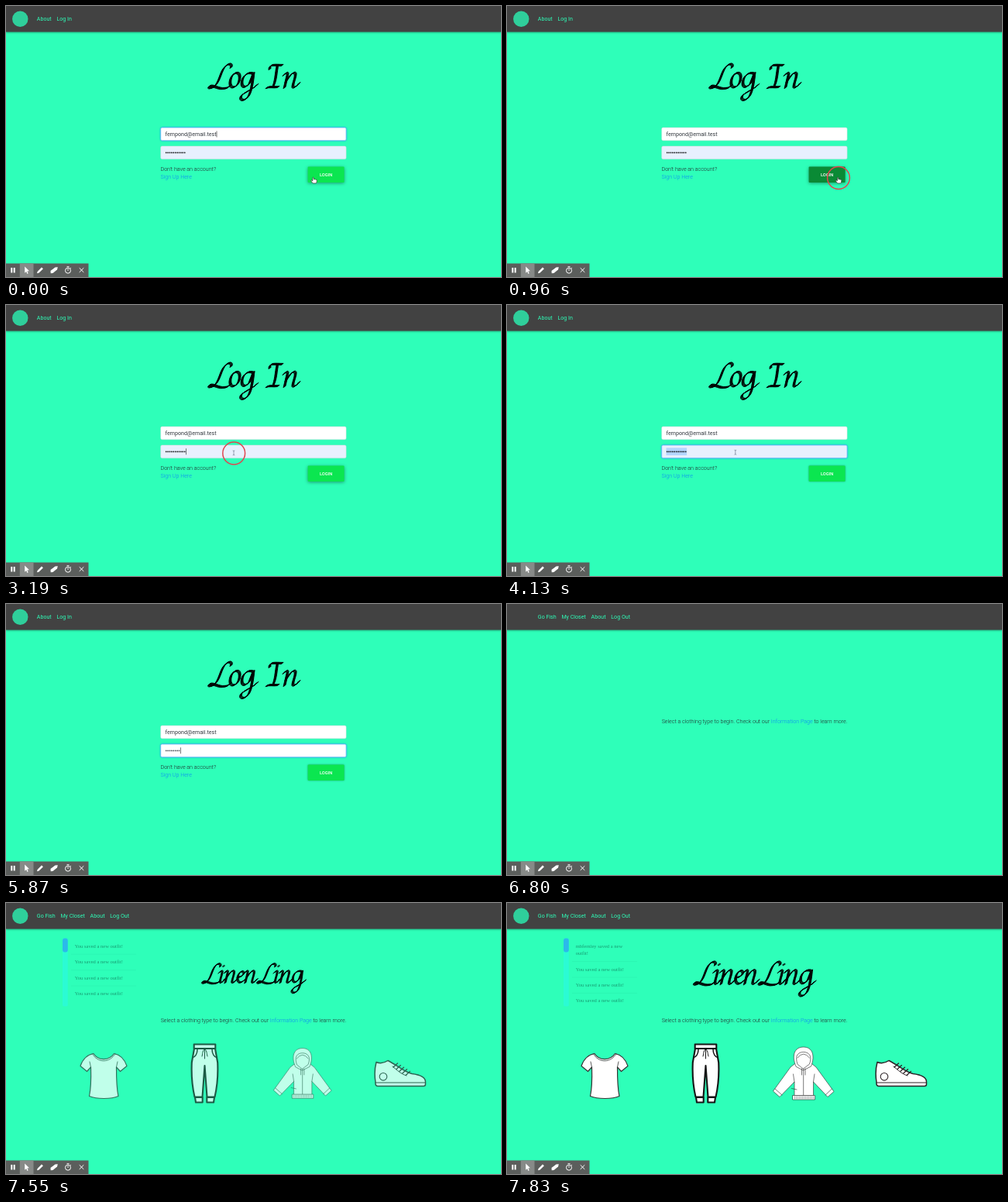
These frames come from a looping animation (639 px wide and 350 px high, 7990 ms). An HTML page:

```html
<!DOCTYPE html>
<html lang="en">
<head>
<meta charset="utf-8">
<title>Log In</title>
<style>
html, body { margin: 0; width: 100%; height: 100%; overflow: hidden; background: #2effb9; }
svg { display: block; width: 100vw; height: 100vh; }
text { font: 300 7.1px Roboto, sans-serif; fill: #212529; white-space: pre; }
.nav text { font-weight: 400; fill: #2effb9; }
.link { fill: #0a86f5; }
.field { font-weight: 400; fill: #343a40; }
.btn { font-size: 5.68px; font-weight: 500; fill: #fff; text-anchor: middle; }
.feed text { font: 6.55px "Liberation Serif", serif; fill: #189a72; }
.pen { fill: none; stroke: #000; stroke-width: .9; stroke-linecap: round; stroke-linejoin: round; }
.wear { fill: #fff; stroke: #151515; stroke-linejoin: round; stroke-linecap: round; }
.line { fill: none; }
.bar { filter: drop-shadow(0 1px 1.2px rgba(0,0,0,.3)); }
</style>
</head>
<body>
<svg viewBox="0 0 639 350" preserveAspectRatio="none">
  <rect width="639" height="350" fill="#2effb9"/>
  <rect class="bar" width="639" height="33.5" fill="#424242"/>
  <circle id="logo" cx="18.3" cy="16.8" r="10.2" fill="#2fcf9b"/>

  <g id="login">
    <g class="nav"><text x="39.8" y="19.2">About</text><text x="65.4" y="19.2">Log In</text></g>
    <g id="heading" transform="translate(260.5 105.5)" aria-label="Log In"></g>
    <rect id="mailBox" x="199.7" y="157" width="239.4" height="16.8" rx="1.8" fill="#fff"/>
    <rect id="passBox" x="199.7" y="181" width="239.4" height="16.8" rx="1.8"/>
    <text class="field" x="205.5" y="168">fernpond@email.test</text>
    <rect id="mark" x="205.5" y="184.5" width="26.6" height="9.6" fill="#b4d5fe"/>
    <g id="dots"></g>
    <rect id="caret" width=".6" height="8" fill="#222"/>
    <text x="199.5" y="212.6">Don't have an account?</text>
    <text class="link" x="199.5" y="223.2">Sign Up Here</text>
    <rect id="button" x="389.6" y="207.6" width="47" height="20.4" rx="1"/>
    <text class="btn" x="413.1" y="219.9">LOGIN</text>
    <circle id="ring" r="14.4" fill="none" stroke="#e0454f" stroke-width="1.5"/>
    <path id="hand" d="M-1.6-3.6q.8-.7 1.4 0v2.2q1-.5 1.4.1 1-.4 1.4.3 1.2-.2 1.3.6l-.5 3-.7 1h-4l-2.4-3q-.2-1.2 1-.8l1.1.8z" fill="#fff" stroke="#222" stroke-width=".6"/>
    <path id="beam" d="M-1.3-3q1.3 0 1.3 1v4q0 1-1.3 1M1.3-3Q0-3 0-2M0 2q0 1 1.3 1" fill="none" stroke="#5f6a80" stroke-width=".6"/>
  </g>

  <g id="home">
    <g class="nav">
      <text x="39.8" y="19.2">Go Fish</text><text x="70.4" y="19.2">My Closet</text>
      <text x="108.6" y="19.2">About</text><text x="134.3" y="19.2">Log Out</text>
    </g>
    <text x="319.5" y="154" text-anchor="middle">Select a clothing type to begin. Check out our <tspan class="link">Information Page</tspan> to learn more.</text>
    <g id="feed" class="feed">
      <rect x="73" y="45.5" width="6.8" height="88" rx="2" fill="#2bfbd4"/>
      <rect x="73" y="45.5" width="6.8" height="18" rx="3" fill="#2bb9ea"/>
      <g id="posts"></g>
    </g>
    <g id="brand" aria-label="LinenLing"></g>
    <g id="clothes" class="wear">
      <g stroke="#333" stroke-width="1.2">
        <path d="M113 194.5C119 204 133 204 139.5 194.5C148 196 153 202 156 210.5L147.5 217.5 142.5 212C142.5 228 143 240 145 249.5C136 253.5 117 253.5 107.5 249.5C109.5 240 110 228 109.5 212L104.5 217.5 96 210.5C99 202 104 196 113 194.5Z"/>
        <path class="line" d="M111.5 194.7C118 207 134 207 141 194.7M109.5 212L108 205M142.5 212L144 205" stroke-width=".8"/>
      </g>
      <g stroke-width="2.1">
        <path d="M243 188L239.8 206C239 224 241 240 243.5 250.5H253.5L256.5 210 259.5 250.5H269.5C272 240 274 224 273.2 206L270 188Z"/>
        <path d="M242.7 182.5H270.3V188H242.7ZM244 251H253.7V257.5H245ZM259.3 251H269L268 257.5H259.3Z"/>
        <path class="line" d="M247 189C247 195 244 199 241 199.5M266 189C266 195 269 199 272 199.5" stroke-width="1.5"/>
        <path class="line" d="M256.5 188C253 192 254 195 253 198M256.5 188C260 192 259 195 260 198M256.5 189V201" stroke-width="1"/>
      </g>
      <g id="hoodie" stroke="#333" stroke-width=".65">
        <path d="M371 208L366 212 343.5 243 352 250.5 371 231V249H395.5V231L414 250.5 422 243.5 399 212 394 208Z"/>
        <path d="M373 211C367 197 371 186 382.7 186S398 197 392.5 211L382.7 216Z"/>
        <path d="M375 208C371 197 376 192.5 382.7 192.5S394.5 197 390.500 208L382.7 214Z"/>
        <path class="line" d="M375 200Q382.7 190 390.500 200M382.7 214V249M380.5 214V222M385 214V222M371 231L369.5 221M395.5 231L397 221M374 241L367.5 239.5M346 240L355 248M419.5 240L411 248"/>
        <rect x="369" y="248.5" width="28.5" height="5.5"/>
        <path d="M371 251.2H396" stroke-width="4" stroke-dasharray=".4 1.6" stroke-linecap="butt"/>
      </g>
      <g stroke="#2b2226" stroke-width="1.5">
        <path d="M478 205.5C484 208 490 205.5 493 203.5C504 209 514 218 524 220.500C536 222 541.5 226 541.5 231V234Q541.5 236.5 539 236.5H480Q476.5 236.5 477 231.5C475.5 222 476 213 478 205.5Z"/>
        <circle cx="487" cy="224.3" r="4.8" class="line" stroke-width="1.1"/>
        <path class="line" d="M477 232H541M499 211C505 216 510 221 517 223" stroke-width="1"/>
        <path id="laces" class="line" stroke-width="1.3"/>
      </g>
    </g>
  </g>

  <g>
    <rect y="332.5" width="106.5" height="17.5" fill="#5b5e5c"/>
    <rect x="17.8" y="332.5" width="17.7" height="17.5" fill="#878a88"/>
    <g fill="#fff">
      <path d="M6.3 338h2v6.500h-2zM9.7 338h2v6.500h-2z"/>
      <path d="M24.2 336.6L30 342.2 27.4 342.5 28.7 345.3 27.4 345.9 26.2 343 24.2 344.7Z"/>
      <path d="M40 345.3L40.6 343 46 337.6 47.9 339.4 42.4 344.8Z"/>
      <path d="M57.5 342L63.5 337.5 66.8 337.3 66 340.5 60.5 345 57.7 345.3Z"/>
    </g>
    <g fill="none" stroke="#fff">
      <circle cx="80" cy="341.7" r="3.5"/>
      <path d="M78.5 336.7h3M80 339.5v2.3M83 338l.8.8M94.7 338.3l5.6 5.6M100.3 338.3l-5.6 5.6"/>
    </g>
  </g>
</svg>
<script>
const LOOP = 7990;
const $ = id => document.getElementById(id);
const set = (id, attrs) => { for (const k in attrs) $(id).setAttribute(k, attrs[k]); };
const show = (id, on) => set(id, { visibility: on ? 'inherit' : 'hidden' });
const place = (id, at) => { show(id, at); if (at) set(id, { transform: `translate(${at})` }); };

// Pen strokes as [advance, centre line]; a slanted nib gives them weight.
const GLYPHS = {
  L: [28, 'M30-26C32-31 27-32 23-28C16-21 16-8 8-1C4 1 0 1 2-2C6-4 14 2 20 1C25 1 28-1 29-3'],
  o: [14, 'M8-19C2-18-1-6 2-2C5 2 12-3 13-11C14-18 11-21 6-18'],
  g: [21, 'M17-18C9-22 2-14 2-6C2 1 8 0 12-6L17-19C16-8 14 8 9 13C4 18-1 16 1 11C4 6 14 4 22-4'],
  ' ': [13, ''],
  I: [22, 'M4-24C3-31 9-29 20-29M14-29C12-20 12-8 8-1M0 0C5-2 10 0 15-1'],
  n: [19, 'M0-16C3-20 5-20 5-17L1 0M3-8C8-16 13-22 15-18C16-14 11-4 12-1C13 1 17-2 20-6'],
  i: [9, 'M0-16C3-20 6-20 5-16C4-10 1-4 2-1C3 1 7-2 9-6M7-27l.8.5'],
  e: [13, 'M2-9C10-9 14-16 10-18C6-20 0-11 2-4C4 2 10-1 14-6']
};

function letter(word) {
  let x = 0, out = '';
  for (const ch of word) {
    const [advance, d] = GLYPHS[ch];
    for (let k = -3; k <= 3; k++)
      out += `<path class="pen" transform="translate(${x + k * .48} ${-k * .36})" d="${d}"/>`;
    x += advance;
  }
  return out;
}

$('heading').innerHTML = letter('Log In');
$('brand').innerHTML = letter('LinenLing');
$('dots').innerHTML = Array.from({ length: 11 }, (_, i) =>
  `<circle cx="${206.7 + 2.4 * i}" cy="189.4" r=".85"/>`).join('');
set('laces', { d: [0, 1, 2, 3, 4].map(i => `M${500 + 4 * i} ${212 + 2.6 * i}l5.5-5`).join('') });

const SAVED = 'You saved a new outfit!';
function posts(fresh) {
  const line = (s, y) => `<text x="88.7" y="${y}">${s}</text>`;
  const rule = y => `<path d="M84 ${y}H168" stroke="#29ecac" stroke-width=".5"/>`;
  let out = fresh ? line('mbfernley saved a new', 57.7) + line('outfit!', 67) + rule(75.5) : '';
  const count = fresh ? 3 : 4, top = fresh ? 87.6 : 57.8;
  for (let i = 0; i < count; i++) {
    const y = top + 20.4 * i;
    out += line(SAVED, y) + (i < count - 1 ? rule(y + 8.4) : '');
  }
  return out;
}

const mailCaret = [271.7, 161.5];
const passCaret = n => [205.8 + 2.4 * n, 185.3];

// Each step changes part of the state and holds until the next.
const STEPS = [
  [0, { page: 'login', focus: 'mail', caret: mailCaret, hand: [397.5, 225.3], dots: 11, filled: true, hover: true }],
  [100, { hand: [406, 225.3] }],
  [120, { hand: [413, 225.3], caret: null }],
  [270, { hand: [422, 225.3] }],
  [400, { hand: [428, 225.3], caret: mailCaret }],
  [960, { focus: '', caret: null, ring: [428, 222], pressed: true }],
  [1120, { ring: null, pressed: false }],
  [1310, { hand: null }],
  [2350, { hand: [428, 224.8] }],
  [2580, { hand: null }],
  [2730, { beam: [296.5, 168] }],
  [2860, { beam: [294.6, 184] }],
  [3010, { beam: [294.3, 186.5] }],
  [3190, { beam: [294, 191], ring: [294.2, 191.5], caret: passCaret(11) }],
  [3340, { ring: null, focus: 'pass', hover: false }],
  [3490, { beam: [294.8, 190.3] }],
  [3670, { ring: [295.5, 190.5] }],
  [3790, { marked: true, caret: null }],
  [4130, { ring: null }],
  [4820, { marked: false, filled: false, dots: 2, caret: passCaret(2) }],
  [4950, { dots: 4, caret: passCaret(4) }],
  [5110, { dots: 6, caret: passCaret(6) }],
  [5310, { dots: 7, caret: passCaret(7) }],
  [5510, { dots: 8, caret: passCaret(8) }],
  [5870, { beam: null }],
  [6800, { page: 'home', bare: true }],
  [7230, { bare: false, size: .62, fade: 0 }],
  [7390, { size: .74, fade: .28 }],
  [7550, { size: .85, fade: .7 }],
  [7680, { size: .97, fade: .9 }],
  [7830, { size: 1, fade: 1, fresh: true }]
];

function stateAt(t) {
  const s = {};
  for (const [at, change] of STEPS) if (t >= at) Object.assign(s, change);
  return s;
}

function focusBox(id, on) {
  set(id, { stroke: on ? '#66b0f5' : '#ced4da', 'stroke-width': on ? .8 : .45 });
  $(id).style.filter = on ? 'drop-shadow(0 0 1.3px rgba(0,123,255,.6))' : '';
}

function drawLogin(s) {
  focusBox('mailBox', s.focus === 'mail');
  focusBox('passBox', s.focus === 'pass');
  set('passBox', { fill: s.filled ? '#e8f0fe' : '#fff' });
  set('dots', { fill: s.filled ? '#111' : '#495057' });
  [...$('dots').children].forEach((dot, i) => dot.setAttribute('visibility', i < s.dots ? 'inherit' : 'hidden'));
  show('mark', s.marked);
  for (const id of ['caret', 'ring', 'hand', 'beam']) place(id, s[id]);
  set('button', { fill: s.pressed ? '#0a8a35' : '#0be650' });
  $('button').style.filter = s.hover
    ? 'drop-shadow(0 1.5px 2.2px rgba(0,0,0,.4))'
    : 'drop-shadow(0 .8px 1.3px rgba(0,0,0,.35))';
}

let shownFeed;
function drawHome(s) {
  for (const id of ['feed', 'brand', 'clothes']) show(id, !s.bare);
  if (s.bare) return;
  const fresh = !!s.fresh;
  if (fresh !== shownFeed) $('posts').innerHTML = posts(shownFeed = fresh);
  set('brand', { transform: `translate(321 93) scale(${s.size * .95}) translate(-85 12.5)` });
  set('clothes', { opacity: s.fade });
  set('hoodie', { transform: `translate(382.7 219) scale(${.84 + .16 * s.fade}) translate(-382.7 -219)` });
}

let last;
function render(t) {
  const step = STEPS.filter(([at]) => t >= at).length;
  if (step === last) return;
  last = step;
  const s = stateAt(t), login = s.page === 'login';
  set('login', { display: login ? 'inline' : 'none' });
  set('home', { display: login ? 'none' : 'inline' });
  show('logo', !s.bare);
  login ? drawLogin(s) : drawHome(s);
}

const start = performance.now();
function tick() {
  render((performance.now() - start) % LOOP);
  requestAnimationFrame(tick);
}
tick();
</script>
</body>
</html>
```
